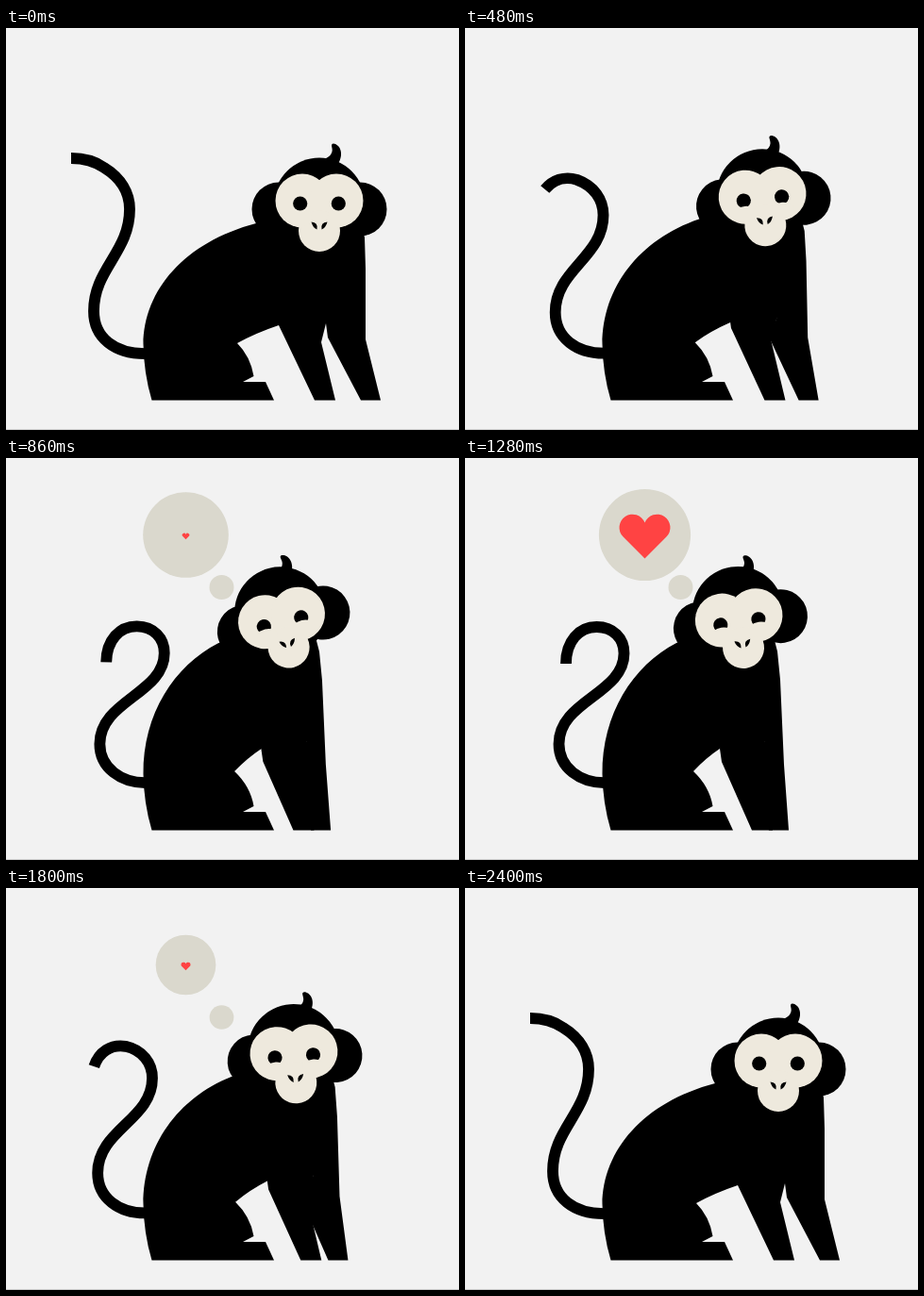
An HTML page for the animation above (2.42 s loop, 480 by 426 pixels).

```html
<!DOCTYPE html>
<html lang="en">
<head>
<meta charset="utf-8">
<title>Monkey in love</title>
<style>
  html, body { margin: 0; height: 100%; overflow: hidden; background: #f2f2f2; }
  svg { display: block; width: 100vw; height: 100vh; }
</style>
</head>
<body>
<svg viewBox="0 0 480 426">
  <path d="M0 425.5H480" stroke="#cbcbcb"/>
  <g fill="#dad8cd">
    <circle id="small" r="13"/>
    <circle id="big" r="48.6"/>
  </g>
  <path id="heart" fill="#ff4343" d="M0 23.5L-22.9 .6A14 14 0 1 1 0 -14.5A14 14 0 1 1 22.9 .6Z"/>

  <path id="tail" fill="none" stroke="#000" stroke-width="11.8"/>
  <path id="torso"/>
  <path id="leg"/>

  <!-- head: the origin lies midway between the eyes -->
  <g id="head">
    <g id="ears">
      <circle cx="-43" cy="6" r="28.5"/>
      <circle cx="43" cy="6" r="28.5"/>
      <path d="M-10 -44C6 -46 12 -49 13.5 -55C14.5 -59 11 -63 15 -63.5C21 -63 27 -54 20 -42Z"/>
    </g>
    <circle id="skull" r="48.5"/>
    <g fill="#eee9dd">
      <circle cx="-18" cy="-3" r="28.5"/>
      <circle cx="18" cy="-3" r="28.5"/>
      <circle cy="29" r="22"/>
    </g>
    <g id="features">
      <circle cx="-20.3" r="7.6"/>
      <circle cx="20.3" r="7.6"/>
      <path d="M-8.5 19.5Q-1 20 -2.5 27.5Q-7 25.5 -8.5 19.5ZM8.5 19.5Q1 20 2.5 27.5Q7 25.5 8.5 19.5Z"/>
    </g>
    <g id="cheeks" fill="#eee9dd">
      <ellipse cx="-20" cy="16" rx="12" ry="8"/>
      <ellipse cx="20" cy="16" rx="12" ry="8"/>
    </g>
  </g>
</svg>
<script>
const LOOP = 2420, MOVE = 760, POP = 360;
const $ = id => document.getElementById(id);

// Each shape as [leaning forward, leaning back]
const shapes = {
  tail: [
    'M69 138C83 138 94 141 104 148C122 159 131 175 131 192C131 238 93 255 93 300C93 328 115 346 150 345',
    'M107 218C107 194 121 179 139.5 179C157 179 168.5 191 168.5 207C168.5 250 99.5 257 99.5 303C99.5 328 122 345 150 344'
  ],
  torso: [
    'M154.5 394.5Q146 366 145.5 335C146 278 189 227 265 207L332 186L372 190L380 222L381 255L381 330L397 394.5L376 394.5L341 328L339 313L289 315Q265 323 245 334Q259 348 262.5 369L251 375L275 375L284 394.5Z',
    'M154.5 394.5Q146 366 145.5 335C145 271 178 220 224 196L290 174L322 170L331 205L334 235L338 325L343 394.5L322 394.5L296 328L318 300L270 308Q255 318 242 332Q259 348 262.5 369L251 375L275 375L284 394.5Z'
  ],
  leg: [
    'M289 315L305 290L339 300L339 313L334 333L349 394.5L327 394.5L289 315Z',
    'M270 308L290 280L318 285L318 300L311 330L326 394.5L304 394.5L272 322Z'
  ]
};

const numbers = /-?[\d.]+/g;

function mix([a, b], p) {
  const ends = b.match(numbers);
  let i = 0;
  return a.replace(numbers, n => +n + (ends[i++] - n) * p);
}

// cubic-bezier(.4, 0, .2, 1)
function ease(x) {
  if (x <= 0) return 0;
  if (x >= 1) return 1;
  let lo = 0, hi = 1, s;
  for (let i = 0; i < 24; i++) {
    s = (lo + hi) / 2;
    const at = 1.2 * s * (1 - s) ** 2 + 0.6 * s * s * (1 - s) + s ** 3;
    if (at < x) lo = s; else hi = s;
  }
  return s * s * (3 - 2 * s);
}

// Rises from 0 to 1 at one time and falls back at another
const pulse = (t, rise, fall, up, down = up) =>
  ease((t - rise) / up) - ease((t - fall) / down);

const place = (id, value) => $(id).setAttribute('transform', value);
const pop = (id, x, y, scale) => place(id, `translate(${x} ${y}) scale(${scale})`);

function draw(t) {
  const lean = pulse(t, 240, 1575, MOVE);
  const tilt = -6.5 * lean - 7.5 * pulse(t, 240, 940, MOVE);

  for (const id in shapes) $(id).setAttribute('d', mix(shapes[id], lean));
  place('head', `translate(${332 - 43.5 * lean} ${172 - 13.5 * lean}) rotate(${tilt}) translate(0 14)`);
  place('ears', `translate(${lean} ${-4 * lean})`);
  place('skull', `translate(0 ${-9 * lean})`);
  place('features', `translate(0 ${1.5 * lean})`);
  place('cheeks', `translate(0 ${-3.5 * lean})`);

  pop('small', 228.5, 137, pulse(t, 500, 1783, POP, 270));
  pop('big', 190.5, 81.5, pulse(t, 613, 1696, POP));
  pop('heart', 190.5, 83, pulse(t, 788, 1609, POP));
}

const start = performance.now();
function tick() {
  draw((performance.now() - start) % LOOP);
  requestAnimationFrame(tick);
}
tick();
</script>
</body>
</html>
```
